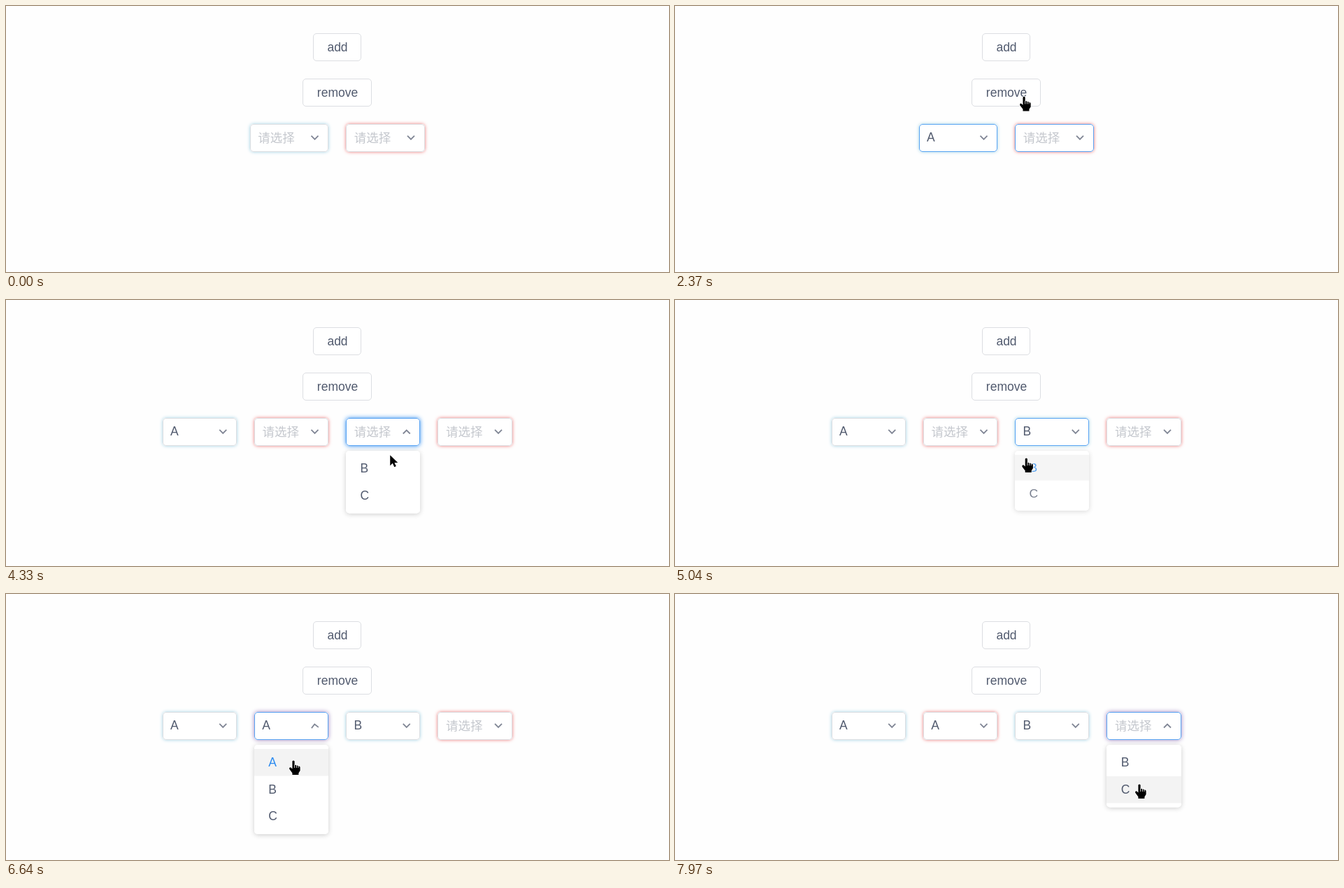
These frames come from a looping animation (948x381 px, 8 s). An HTML page with a canvas:

```html
<!DOCTYPE html>
<html lang="zh">
<head>
<meta charset="utf-8">
<title>Linked selects</title>
<style>
html, body { margin: 0; width: 100%; height: 100%; overflow: hidden; background: #fefefe; }
canvas { display: block; }
</style>
</head>
<body>
<canvas id="c" width="948" height="381"></canvas>
<script>
const ctx = document.getElementById('c').getContext('2d');
const LOOP = 8000, MID = 474;
const FONT = '17.5px "Liberation Sans", Arial, "Noto Sans CJK SC", "Noto Sans CJK", sans-serif';
const INK = [81, 90, 110], LINE = [220, 222, 226], HOVER = [87, 163, 243];
const BLUE = [45, 140, 240], PLUM = [158, 128, 190], SHADE = [243, 243, 243];
const CALM = [160, 210, 228], ALERT = [238, 120, 120];
const ROW = 38.5, PANEL_Y = 216, PAD = 6.25;

const button = (label, y, w) => ({ label, x: Math.floor(MID - w / 2), y, w, h: 40 });
const buttons = [button('add', 39, 69), button('remove', 104, 99)];

const panels = [
  { i: 0, opts: 'ABC', open: 1050, close: 1740, blur: 2480, pick: 'A', glow: BLUE },
  { i: 2, opts: 'BC', open: 4130, close: 4800, blur: 5480, pick: 'B', glow: BLUE },
  { i: 1, opts: 'ABC', open: 5620, close: 6600, blur: 6640, pick: 'A', glow: PLUM },
  { i: 3, opts: 'BC', open: 7500, close: LOOP, blur: LOOP, pick: '', glow: PLUM }
];

// places where the pointer rests
const stop = (from, to, x, y) => ({ from, to, x, y });
const stops = [
  stop(280, 280, 609, 356),
  stop(1000, 1120, 412, 190),
  stop(1385, 1740, 411, 246),
  stop(2120, 2275, 508, 176),
  stop(2480, 3420, 486, 64),
  stop(4130, 4190, 547, 196),
  stop(4450, 4850, 551, 243),
  stop(5300, 5680, 401, 194),
  stop(6150, 6640, 411, 239),
  stop(7400, 7550, 654, 193),
  stop(7780, LOOP, 664, 273)
];

// spans in which the picture updates, about every 70 ms
const spans = [[280, 1540], [1740, 2920], [3210, 3280], [3420, 4610], [4810, 6290], [6640, 7970]];

const clamp = v => Math.max(0, Math.min(1, v));
const ramp = (t, from, ms) => clamp((t - from) / ms);
const smooth = k => k * k * (3 - 2 * k);
const mix = (a, b, k) => a.map((v, i) => v + (b[i] - v) * k);
const rgb = (c, a = 1) => `rgba(${c.map(Math.round).join()},${a})`;

function snap(t) {
  const span = spans.filter(s => s[0] <= t).pop();
  if (!span) return 0;
  const [a, b] = span;
  const step = (b - a) / Math.round((b - a) / 70);
  return Math.min(b, a + Math.floor((t - a) / step + 0.01) * step);
}

function pointer(t) {
  const n = stops.filter(s => s.from <= t).length;
  if (!n) return null;
  const p = stops[n - 1], q = stops[n] || p;
  const k = smooth(ramp(t, p.to, q.from - p.to || 1));
  return { x: p.x + (q.x - p.x) * k, y: p.y + (q.y - p.y) * k };
}

const count = t => t < 2640 ? 2 : t < 3205 ? 3 : 4;

// selects share a centred row; left and right keep the unrounded edges
function box(i, t) {
  const n = count(t);
  const w = 125 - 25 * (n - 1) / n;
  const left = MID - 62.5 * n + i * (w + 25), right = left + w;
  const x = Math.floor(left);
  return { x, y: 169, w: Math.floor(right) - x, h: 40, left, right };
}

function optBox(p, k, t) {
  const b = box(p.i, t);
  return { x: b.x, y: PANEL_Y + PAD + k * ROW, w: b.w, h: ROW };
}

const inside = (pos, b) => pos && pos.x >= b.x && pos.x < b.x + b.w && pos.y >= b.y && pos.y < b.y + b.h;

// hover fades: share of the last moments spent inside a box
function hover(t, getBox, since = 0) {
  let sum = 0;
  for (let k = 0; k < 10; k++) {
    const s = t - 60 - k * 20;
    if (s >= since && inside(pointer(s), getBox(s))) sum++;
  }
  return sum / 10;
}

const focus = (p, t) => ramp(t, p.open, 180) * (1 - ramp(t, p.close, 200) ** 2);

function shown(p, t) {
  if (t < p.open) return 0;
  return t < p.close ? 1 - (1 - ramp(t, p.open, 300)) ** 5 : 1 - ramp(t, p.close, 300) ** 5;
}

function rounded(b, r, inset = 0) {
  ctx.beginPath();
  ctx.roundRect(b.x + inset, b.y + inset, b.w - 2 * inset, b.h - 2 * inset, r);
}

function fillBox(b, color, inset = 0) {
  ctx.fillStyle = color;
  rounded(b, 5 - inset, inset);
  ctx.fill();
}

// the shadow stays outside the box, so fading boxes remain white
function shadowed(b, color, blur, dy = 0) {
  ctx.save();
  rounded(b, 5);
  ctx.rect(b.x - 30, b.y - 30, b.w + 60, b.h + 60);
  ctx.clip('evenodd');
  ctx.shadowColor = color;
  ctx.shadowBlur = blur;
  ctx.shadowOffsetY = dy;
  fillBox(b, '#fff');
  ctx.restore();
  fillBox(b, '#fff');
}

function outline(b, color) {
  ctx.strokeStyle = color;
  ctx.lineWidth = 1;
  rounded(b, 4.5, 0.5);
  ctx.stroke();
}

function text(s, x, y, color, align = 'left') {
  ctx.font = FONT;
  ctx.textAlign = align;
  ctx.fillStyle = color;
  ctx.fillText(s, x, Math.round(y));
}

function drawButton(b, t) {
  const h = hover(t, () => b);
  if (b.label === 'add') {
    const ring = ramp(t, 2580, 120) * (1 - ramp(t, 4030, 150));
    fillBox(b, rgb(BLUE, 0.2 * ring), -2.5);
  }
  fillBox(b, '#fff');
  outline(b, rgb(mix(LINE, HOVER, h)));
  text(b.label, MID, b.y + 26, rgb(mix(INK, HOVER, h)), 'center');
}

function chevron(x, y, turn) {
  ctx.save();
  ctx.translate(x, y);
  ctx.rotate(Math.PI * turn);
  ctx.strokeStyle = '#808695';
  ctx.lineWidth = 1.8;
  ctx.beginPath();
  ctx.moveTo(-5, -2.8);
  ctx.lineTo(0, 2.2);
  ctx.lineTo(5, -2.8);
  ctx.stroke();
  ctx.restore();
}

function drawSelect(i, t) {
  const b = box(i, t);
  const p = panels.find(q => q.i === i);
  const on = focus(p, t);
  const picked = t >= p.close;
  const calm = i === 0 || (i === 2 && picked);
  const held = ramp(t, p.open, 150) * (1 - ramp(t, p.blur, 300));
  const edge = Math.max(held, hover(t, s => box(i, s)));

  shadowed(b, rgb(mix(calm ? CALM : ALERT, p.glow, on)), 5 + on);
  outline(b, rgb(mix(LINE, HOVER, edge)));
  if (picked) text(p.pick, b.left + 11, 194, rgb(INK));
  else text('请选择', b.left + 11.25, 194.5, '#c5c8ce');
  chevron(b.right - 20, 188.7, on);
}

function drawPanel(p, t) {
  const e = shown(p, t);
  if (e <= 0) return;
  const b = box(p.i, t);
  ctx.save();
  ctx.globalAlpha = e;
  ctx.translate(0, PANEL_Y * 0.2 * (1 - e));
  ctx.scale(1, 0.8 + 0.2 * e);
  shadowed({ x: b.x, y: PANEL_Y, w: b.w, h: p.opts.length * ROW + 2 * PAD }, 'rgba(0,0,0,.2)', 7.5, 1.25);
  [...p.opts].forEach((o, k) => {
    const r = optBox(p, k, t);
    ctx.fillStyle = rgb(SHADE, hover(t, s => optBox(p, k, s), p.open));
    ctx.fillRect(r.x, Math.round(r.y), r.w, r.h);
    const chosen = t >= p.close && o === p.pick;
    text(o, b.left + 20, r.y + 24.9, rgb(chosen ? BLUE : INK));
  });
  ctx.restore();
}

const ARROW = new Path2D('M0 0V15L3.6 11.6L6 17L8.6 15.9L6.2 10.7H11Z');
const HAND = new Path2D('M-1.6 .4Q0 -1.6 1.6 .4V6Q3.4 5 4.4 6.8Q6 5.8 7 7.6Q9.6 7 9.6 9.6V14L7.4 17.4V20H-1.6V17.4L-5.8 11.8Q-6.4 9 -4 9.2L-1.6 11.4Z');

function drawPointer(t) {
  const pos = pointer(t);
  if (!pos) return;
  const targets = [...buttons];
  for (let i = 0; i < count(t); i++) targets.push(box(i, t));
  for (const p of panels) {
    if (shown(p, t) > 0) [...p.opts].forEach((o, k) => targets.push(optBox(p, k, t)));
  }
  const hand = targets.some(b => inside(pos, b));
  const shape = hand ? HAND : ARROW;
  ctx.save();
  ctx.translate(pos.x, pos.y);
  ctx.lineJoin = 'round';
  ctx.strokeStyle = '#fff';
  ctx.lineWidth = 1.6;
  ctx.stroke(shape);
  ctx.fillStyle = '#000';
  ctx.fill(shape);
  if (hand) {
    ctx.lineWidth = 0.8;
    ctx.beginPath();
    for (const x of [1.6, 4.4, 7]) {
      ctx.moveTo(x, 5.5);
      ctx.lineTo(x, 10);
    }
    ctx.stroke();
  }
  ctx.restore();
}

function draw(t) {
  ctx.fillStyle = '#fefefe';
  ctx.fillRect(0, 0, 948, 381);
  buttons.forEach(b => drawButton(b, t));
  for (let i = 0; i < count(t); i++) drawSelect(i, t);
  panels.forEach(p => drawPanel(p, t));
  drawPointer(t);
}

const start = performance.now();
function tick() {
  draw(snap((performance.now() - start) % LOOP));
  requestAnimationFrame(tick);
}
tick();
</script>
</body>
</html>
```
